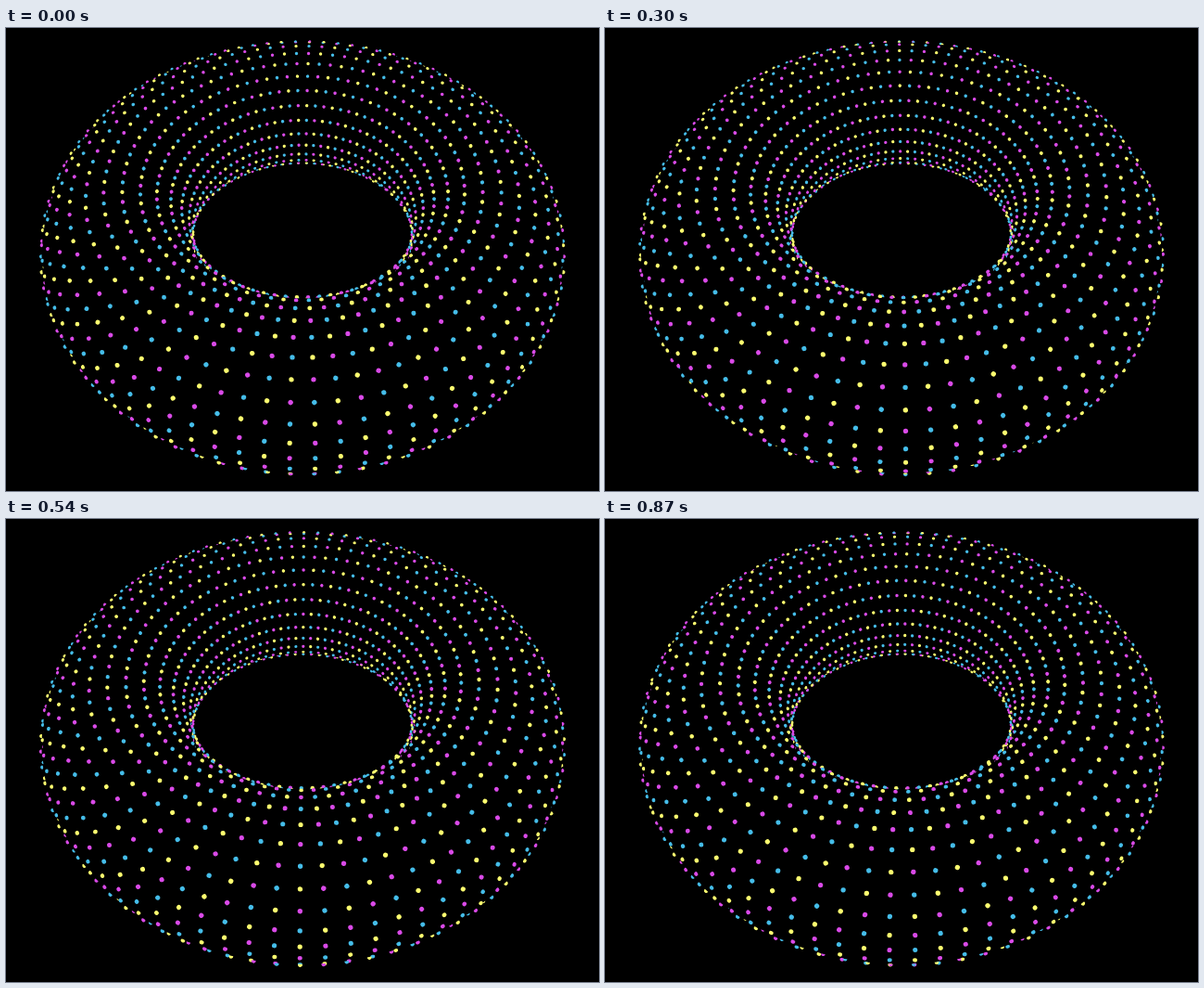
Write an HTML page with a canvas that moves like this. It is 640 by 499 pixels and loops after 0.9 s.

```html
<!DOCTYPE html>
<html lang="en">
<head>
<meta charset="utf-8">
<title>Dotted torus</title>
<style>
  html, body { margin: 0; width: 100%; height: 100%; overflow: hidden; background: #000; }
  canvas { display: block; }
</style>
</head>
<body>
<canvas id="stage" width="640" height="499"></canvas>
<script>
const ctx = document.getElementById('stage').getContext('2d');
const LOOP = 900, TAU = 2 * Math.PI, RAD = Math.PI / 180;
const COLS = 84, ROWS = 28;
const COLORS = ['#da4ae8', '#45bde9', '#ffff70'];

// Lengths are in units of the camera distance.
const RING = 0.31134, TUBE = 0.12046, RAISE = 0.0736;
const BEAD = 0.003, LIFT = 0.4; // LIFT: how far beads stand out, in bead radii
const FOCAL = 620, CX = 320, CY = 249.5;
const SIN = Math.sin(52.72 * RAD), COS = Math.cos(52.72 * RAD);
const TOP = 92.3 * RAD;

// Turns (right, toward viewer, up) into camera axes (right, down, away).
const tilt = (x, f, h) => [x, f * SIN - h * COS, -f * COS - h * SIN];

// A bead is a small sphere partly sunk into the black tube.
function drawBead(phi, theta, color) {
  const ct = Math.cos(theta), st = Math.sin(theta);
  const sp = Math.sin(phi), cp = Math.cos(phi);
  const rho = RING + TUBE * ct;
  const [x, down, away] = tilt(rho * sp, rho * cp, TUBE * st);
  const [nx, ny, nz] = tilt(ct * sp, ct * cp, st);
  const y = down - RAISE, z = 1 + away;
  const facing = -(nx * x + ny * y + nz * z) / Math.hypot(x, y, z);

  // Just past the outline only a sliver of the bead still shows.
  const sunk = facing < 0 ? TUBE * facing * facing / 2 / BEAD - LIFT : 0;
  if (sunk >= 1) return;

  const scale = FOCAL / z, r = BEAD * scale;
  const px = CX + x * scale, py = CY + y * scale;
  const dir = Math.atan2(ny, nx), half = Math.acos(sunk);
  ctx.fillStyle = color;
  ctx.beginPath();
  ctx.arc(px, py, r, dir - half, dir + half);
  if (facing >= 0) {
    ctx.ellipse(px, py, r * Math.min(1, facing + LIFT), r, dir, TAU / 4, TAU * 3 / 4);
  }
  ctx.fill();
}

function draw(now) {
  const p = now % LOOP / LOOP;
  ctx.fillStyle = '#000';
  ctx.fillRect(0, 0, 640, 499);
  // Per loop the lattice moves one column round and two rows over the tube.
  for (let col = 0; col < COLS; col++) {
    const phi = (col + 0.5 - p) * TAU / COLS;
    for (let row = 0; row < ROWS; row++) {
      const theta = TOP - (row - ROWS / 2 - 2 * p) * TAU / ROWS;
      drawBead(phi, theta, COLORS[(col + row + 2) % 3]);
    }
  }
  requestAnimationFrame(draw);
}
draw(performance.now());
</script>
</body>
</html>
```
